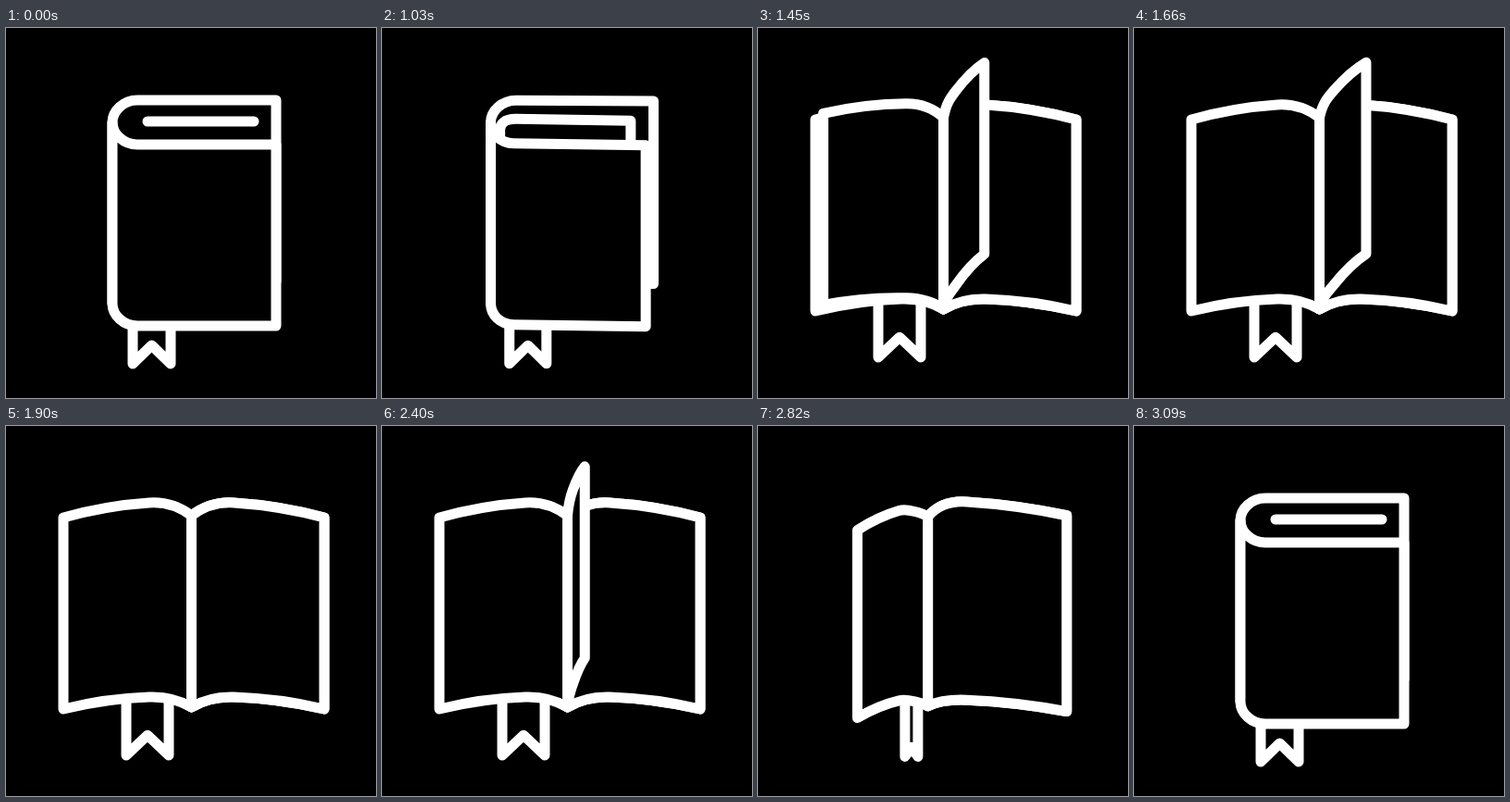
Recreate the animation shown at these times as an HTML page with a canvas. Size 400 by 400 pixels, loop 3120 ms.

```html
<!DOCTYPE html>
<html lang="en">
<head>
<meta charset="utf-8">
<title>Book</title>
<style>
  html, body { margin: 0; width: 100%; height: 100%; overflow: hidden; background: #000; }
  canvas { display: block; width: 100vw; height: 100vh; object-fit: contain; }
</style>
</head>
<body>
<canvas id="stage" width="400" height="400"></canvas>
<script>
const ctx = document.getElementById('stage').getContext('2d');
const LOOP = 3120, STEP = 30, POSES = 30;
const OPEN_AT = 1000, CLOSE_AT = 2190;
const MIDDLE = 203, HALF = 141;                  // open book: centre and half width
const TURNS = [[9, 15.7], [11, 21], [17, 30]];   // start and end pose of each page

const clamp = (v, max = 1) => Math.min(max, Math.max(0, v));
const lerp = (a, b, u) => a + (b - a) * u;
const mix = (p, q, u) => p.map((v, i) => lerp(v, q[i], u));
const ease = v => { const u = clamp(v); return u * u * (3 - 2 * u); };

function line(...points) {
  ctx.beginPath();
  for (const [x, y] of points) ctx.lineTo(x, y);
  ctx.stroke();
}

// The upper edge of a leaf as two curves, spine to knee to corner.
function edge({ spine, knee, corner }, open) {
  const bend = mix(knee, corner, .5);
  bend[1] -= 5 * open;
  const leave = [lerp(spine[0], knee[0], .21 * open), lerp(spine[1], knee[1], .52)];
  const arrive = mix(knee, bend, -lerp(.2, .45, open));
  return [spine, leave, arrive, knee, bend, corner];
}

// The lower edge repeats the upper one; extra stretches its outer part.
function drawLeaf(leaf, open) {
  const top = edge(leaf, open);
  const height = lerp(196, 207, open);
  const outer = height + 3 * open + (leaf.extra || 0);
  const down = ([x, y], h) => [x, y + h];
  const low = edge({
    spine: down(leaf.spine, height),
    knee: down(leaf.knee, outer),
    corner: down(leaf.corner, outer - 3 * open)
  }, open);
  ctx.beginPath();
  ctx.moveTo(...top[0]);
  ctx.bezierCurveTo(...top[1], ...top[2], ...top[3]);
  ctx.quadraticCurveTo(...top[4], ...top[5]);
  ctx.lineTo(...low[5]);
  ctx.quadraticCurveTo(...low[4], ...low[3]);
  ctx.bezierCurveTo(...low[2], ...low[1], ...low[0]);
  ctx.closePath();
  ctx.fill();
  ctx.stroke();
}

// side: 1 for the back cover, -1 for the front one that swings over to the left.
function cover(side, open) {
  const arc = 4 * open * (1 - open);
  const shutY = 102 - 24 * side;
  return {
    spine: mix([115, 102], [200.5, 97], open),
    knee: mix([142, shutY], [200.5 + 45.5 * side, 83], open),
    corner: [lerp(292, MIDDLE + HALF * side, open),
             lerp(shutY, 99, open) + arc * (8 - 5 * side)],
    extra: arc * (4 + 7 * side)
  };
}

function drawBookmark(k, open) {
  const pinch = ease(k / 9) * (1 - ease((k - 9) / 4));
  const x = lerp(157.5, 153, open) + 12 * pinch;
  const w = lerp(20.5, 23, open) - 15.5 * pinch;
  const top = lerp(322, 296, open), tip = lerp(363, 356, open);
  line([x - w, top], [x - w, tip], [x, tip - 5 - .73 * w], [x + w, tip], [x + w, top]);
}

// Page block between the covers, settling onto the back one.
function drawBlock(k, back, open) {
  if (k < 1) return line([153, 101], [268, 101]);
  const u = ease(k / 9);
  drawLeaf({
    spine: mix([128, 110], back.spine, u),
    knee: mix([145, 99], back.knee, u),
    corner: mix([268, 101], back.corner, u),
    extra: back.extra * u
  }, open);
}

// A page turning from right (u = 0) to left (u = 1), lifting on the way.
function drawPage(u, spine) {
  const q = 1 - 2 * u;
  const rise = 47 * q * q - 46 - 22 * Math.max(0, Math.sin(Math.PI * q));
  const x = MIDDLE + HALF * q;
  drawLeaf({
    spine,
    knee: [lerp(spine[0], x, .31), spine[1] - 14 + .26 * rise],
    corner: [x, spine[1] + rise]
  }, 1);
}

function draw(k) {
  ctx.fillStyle = '#000';
  ctx.fillRect(0, 0, 400, 400);
  ctx.strokeStyle = '#fff';
  ctx.lineWidth = 11;
  ctx.lineCap = ctx.lineJoin = 'round';

  const open = ease(k / 13) ** .86;
  const back = cover(1, open);
  drawBookmark(k, open);
  drawLeaf(back, open);
  drawBlock(k, back, open);
  drawLeaf(cover(-1, open), open);
  for (const [from, to] of TURNS) {
    if (k > from && k < to) drawPage(ease((k - from) / (to - from)), back.spine);
  }
}

// Opening runs through the poses in steps; closing runs back.
function poseAt(t) {
  const steps = start => clamp(Math.floor((t - start) / STEP + 1e-6), POSES);
  return steps(OPEN_AT) - steps(CLOSE_AT);
}

const began = performance.now();
function tick() {
  draw(poseAt((performance.now() - began) % LOOP));
  requestAnimationFrame(tick);
}
tick();
</script>
</body>
</html>
```
